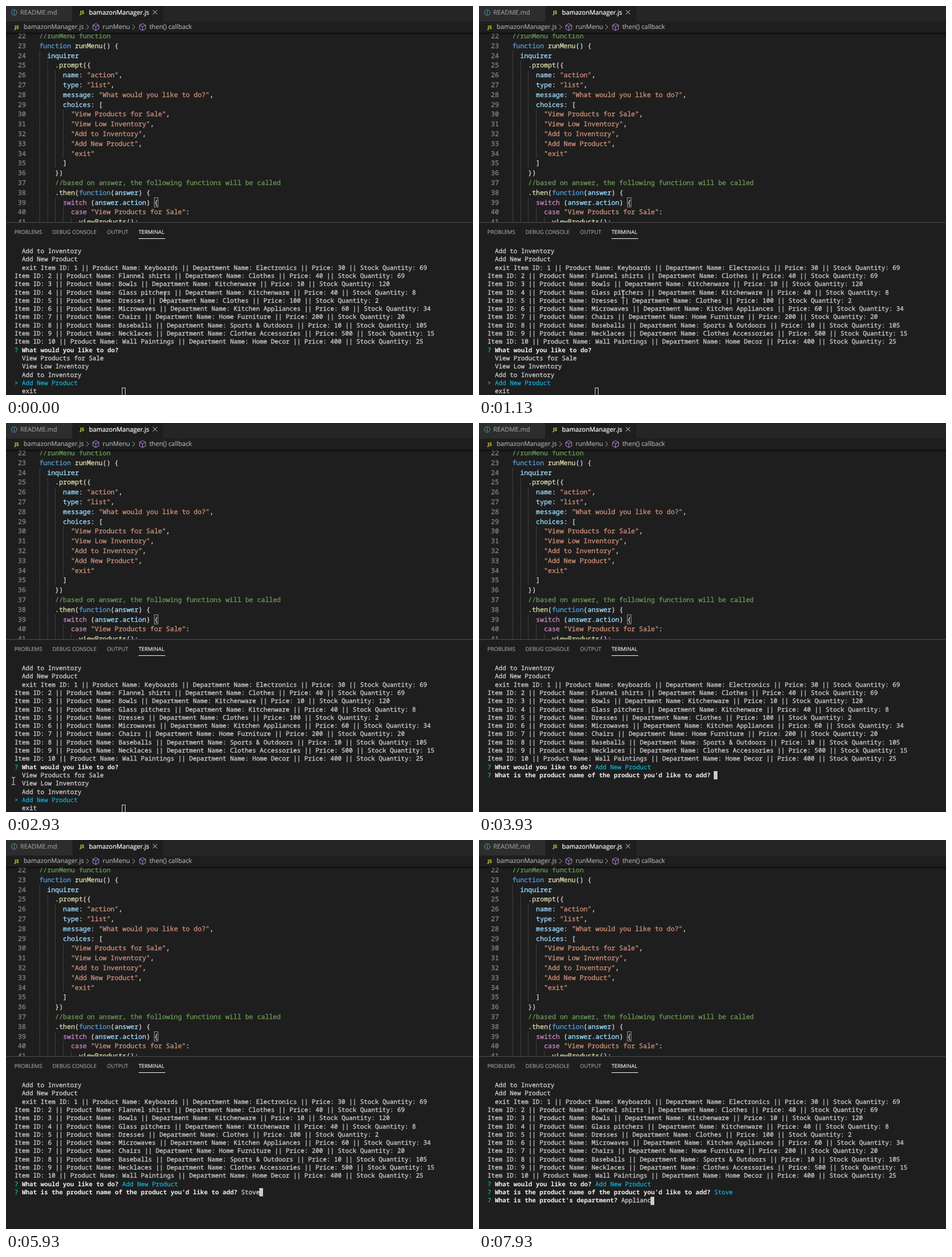
Recreate the animation shown at these times as an HTML page. Size 754 by 628 pixels, loop 8 s.

```html
<!DOCTYPE html>
<html lang="en">
<head>
<meta charset="utf-8">
<title>Terminal session</title>
<style>
  html, body { margin: 0; width: 100%; height: 100%; overflow: hidden; background: #1e1e1e; }
  svg { display: block; width: 754px; height: 628px; }
  text { white-space: pre; text-rendering: geometricPrecision; stroke-width: .2; }
  .code { font: 10.667px "Noto Sans Mono", "DejaVu Sans Mono", monospace; }
  .term { font: 10px "Noto Sans Mono", "DejaVu Sans Mono", monospace; }
  .code, .term { stroke-width: .3; }
  .ui { font: 10.25px "Open Sans", "Noto Sans", sans-serif; }
  .panel { font: 8.7px "Open Sans", "Noto Sans", sans-serif; }
  .badge { font: bold 7.5px "Open Sans", "Noto Sans", sans-serif; }
  .strong { font-weight: bold; stroke-width: 0; }
</style>
</head>
<body>
<svg id="stage" viewBox="0 0 754 628">
  <defs>
    <clipPath id="editorClip"><rect y="43" width="754" height="306"/></clipPath>
    <linearGradient id="shade" x2="0" y2="1">
      <stop stop-color="#000" stop-opacity=".6"/><stop offset="1" stop-color="#000" stop-opacity="0"/>
    </linearGradient>
    <path id="cube" d="M0-5.5 4.8-3V3L0 5.5-4.8 3V-3ZM-4.8-3 0-.6 4.8-3M0-.6V5.5" fill="none" stroke="#b180d7"/>
    <path id="chevron" d="M-2-4 2 0-2 4" fill="none" stroke="#a0a0a0"/>
  </defs>
  <rect width="754" height="628" fill="#1e1e1e"/>
  <g id="editor" clip-path="url(#editorClip)"></g>

  <rect width="754" height="25" fill="#252526"/>
  <rect width="107" height="25" fill="#2d2d2d"/>
  <rect x="107" width="147" height="25" fill="#1e1e1e"/>
  <circle cx="13.3" cy="10.5" r="4.5" fill="none" stroke="#519aba"/>
  <path d="M13.3 9.6V13.2M13.3 7.6V8.7" stroke="#519aba" stroke-width="1.1"/>
  <path d="M237 6.5 244 13.5M244 6.5 237 13.5" stroke="#d0d0d0"/>
  <rect y="43" width="754" height="4" fill="url(#shade)"/>
  <use href="#chevron" x="131.5" y="34"/><use href="#cube" x="145" y="34"/>
  <use href="#chevron" x="206" y="34"/><use href="#cube" x="220.5" y="34"/>

  <path d="M0 349.5H754" stroke="#4a4a4a"/>
  <path d="M214 375.5H257" stroke="#e7e7e7"/>
  <g id="labels"></g>
  <g id="terminal"></g>
  <rect id="caret"/>
  <path id="mouse" d="M-3-6H-1L0-5 1-6H3M0-5V5M-3 6H-1L0 5 1 6H3" fill="none" stroke="#d8d8d8"/>
</svg>
<script>
const $ = id => document.getElementById(id);

function add(parent, tag, attrs, content = '') {
  const el = document.createElementNS('http://www.w3.org/2000/svg', tag);
  for (const key in attrs) el.setAttribute(key, attrs[key]);
  el.textContent = content;
  return parent.appendChild(el);
}

// runs: [text, fill, class]
function addRuns(parent, cls, x, y, runs) {
  const line = add(parent, 'text', { class: cls, x, y });
  for (const [text, fill, style = ''] of runs)
    add(line, 'tspan', { fill, stroke: fill, class: style }, text);
}

// Labels
[
  ['ui', 23, 14.2, 'README.md', '#969696'],
  ['badge', 119.5, 13, 'JS', '#cbcb41'],
  ['ui', 134, 14.2, 'bamazonManager.js', '#ffffff'],
  ['badge', 14, 36.5, 'JS', '#cbcb41'],
  ['ui', 28.5, 37.4, 'bamazonManager.js', '#a9a9a9'],
  ['ui', 156, 37.4, 'runMenu', '#a9a9a9'],
  ['ui', 231.5, 37.4, 'then() callback', '#a9a9a9'],
  ['panel', 13.5, 367.7, 'PROBLEMS', '#979797'],
  ['panel', 75, 367.7, 'DEBUG CONSOLE', '#979797'],
  ['panel', 163, 367.7, 'OUTPUT', '#979797'],
  ['panel', 214, 367.7, 'TERMINAL', '#e7e7e7']
].forEach(([cls, x, y, text, fill]) => addRuns($('labels'), cls, x, y, [[text, fill]]));

// Editor
const source = `//runMenu function
function runMenu() {
  inquirer
    .prompt({
      name: "action",
      type: "list",
      message: "What would you like to do?",
      choices: [
        "View Products for Sale",
        "View Low Inventory",
        "Add to Inventory",
        "Add New Product",
        "exit"
      ]
    })
    //based on answer, the following functions will be called
    .then(function(answer) {
      switch (answer.action) {
        case "View Products for Sale":
          viewProducts();`.split('\n');

const syntax = [
  [/^\/\/.*/, '#6a9955'],
  [/^"[^"]*"/, '#ce9178'],
  [/^function\b/, '#569cd6'],
  [/^(switch|case)\b/, '#c586c0'],
  [/^\w+(?=\()/, '#dcdcaa'],
  [/^\w+/, '#9cdcfe'],
  [/^[^\w"/]+/, '#d4d4d4']
];

function highlight(code) {
  const runs = [];
  while (code) {
    const [pattern, fill] = syntax.find(([p]) => p.test(code));
    const text = code.match(pattern)[0];
    runs.push([text, fill]);
    code = code.slice(text.length);
  }
  return runs;
}

const CODE = { x: 53.7, y: 52, w: 6.4, h: 15.8 };
source.forEach((code, i) => {
  const y = CODE.y + i * CODE.h;
  const indent = code.search(/\S/);
  for (let col = 0; col < indent; col += 2)
    add($('editor'), 'rect', {
      x: Math.round(CODE.x + col * CODE.w), y: y - 11.7, width: 1, height: CODE.h, fill: '#3c3c3c'
    });
  if (code.includes('switch'))
    add($('editor'), 'rect', {
      x: 239.5, y: 309.5, width: 6, height: 15, fill: '#1c261c', stroke: '#888888'
    });
  addRuns($('editor'), 'code', 19.3, y, [[String(22 + i), '#858585']]);
  addRuns($('editor'), 'code', CODE.x + indent * CODE.w, y, highlight(code.trim()));
});

// Terminal
const TERM = { x: 13.8, y: 399, w: 6, h: 13.3 };
const GREY = '#cccccc', CYAN = '#11a8cd', GREEN = '#0dbc79', WHITE = '#f0f0f0';
const products = [
  ['Keyboards', 'Electronics', 30, 69],
  ['Flannel shirts', 'Clothes', 40, 69],
  ['Bowls', 'Kitchenware', 10, 120],
  ['Glass pitchers', 'Kitchenware', 40, 8],
  ['Dresses', 'Clothes', 100, 2],
  ['Microwaves', 'Kitchen Appliances', 60, 34],
  ['Chairs', 'Home Furniture', 200, 20],
  ['Baseballs', 'Sports & Outdoors', 10, 105],
  ['Necklaces', 'Clothes Accessories', 500, 15],
  ['Wall Paintings', 'Home Decor', 400, 25]
];

const plain = text => [[text, GREY]];
const ask = (question, answer = '', fill = CYAN) =>
  [['? ', GREEN], [question + ' ', WHITE, 'strong'], [answer, fill]];

const history = [
  plain('  Add to Inventory'),
  plain('  Add New Product'),
  ...products.map(([name, department, price, stock], i) => plain(
    `${i ? '' : '  exit '}Item ID: ${i + 1} || Product Name: ${name} || ` +
    `Department Name: ${department} || Price: ${price} || Stock Quantity: ${stock}`))
];
const MENU = 'What would you like to do?';
const NAME = "What is the product name of the product you'd like to add?";
const DEPARTMENT = "What is the product's department?";
const menu = [
  ask(MENU),
  plain('  View Products for Sale'),
  plain('  View Low Inventory'),
  plain('  Add to Inventory'),
  [['> Add New Product', CYAN]],
  plain('  exit')
];

function drawRows(parent, rows, first) {
  parent.replaceChildren();
  rows.forEach((runs, i) =>
    addRuns(parent, 'term', TERM.x, TERM.y + (first + i) * TERM.h, runs));
}
drawRows(add($('terminal'), 'g', {}), history, 0);
const prompts = add($('terminal'), 'g', {});

// Timeline, in ms
const LOOP = 8000, FOCUS = 3350, CHOSEN = 3900, NAMED = 5980;
const typed = (text, start, step, t) =>
  text.slice(0, Math.max(0, Math.floor((t - start) / step) + 1));

function session(t) {
  if (t < CHOSEN) return { rows: menu, row: 17, col: 29 };
  const rows = [ask(MENU, 'Add New Product')];
  const named = t >= NAMED;
  const name = typed('Stove', 5000, 180, t);
  rows.push(ask(NAME, name, named ? CYAN : GREY));
  if (!named) return { rows, row: 13, col: NAME.length + 3 + name.length };
  const department = typed('Applianc', 6200, 235, t);
  rows.push(ask(DEPARTMENT, department, GREY));
  return { rows, row: 14, col: DEPARTMENT.length + 3 + department.length };
}

const mousePath = [[0, 256.5, 469], [300, 232.5, 465], [2130, 232.5, 465], [2580, 12, 578], [FOCUS, 12, 578]];
function mouseAt(t) {
  const i = mousePath.findIndex(step => step[0] > t);
  const [t0, x0, y0] = mousePath[i - 1], [t1, x1, y1] = mousePath[i];
  const p = (t - t0) / (t1 - t0), ease = p * p * (3 - 2 * p);
  return `translate(${x0 + (x1 - x0) * ease} ${y0 + (y1 - y0) * ease})`;
}

let shown = '';
function frame() {
  const t = performance.now() % LOOP;
  const { rows, row, col } = session(t);
  const focused = t >= FOCUS;
  const key = [row, col, focused].join();
  if (key !== shown) {
    shown = key;
    drawRows(prompts, rows, 12);
    const inset = focused ? 0 : 0.5;
    const box = {
      x: Math.round(TERM.x + col * TERM.w - 0.4) + inset,
      y: Math.round(TERM.y + row * TERM.h - 9.6) + inset,
      width: 6 - 2 * inset, height: 13.3 - 2 * inset,
      fill: focused ? GREY : 'none', stroke: focused ? 'none' : GREY
    };
    for (const name in box) $('caret').setAttribute(name, box[name]);
  }
  $('mouse').style.display = focused ? 'none' : '';
  if (!focused) $('mouse').setAttribute('transform', mouseAt(t));
  requestAnimationFrame(frame);
}
frame();
</script>
</body>
</html>
```
